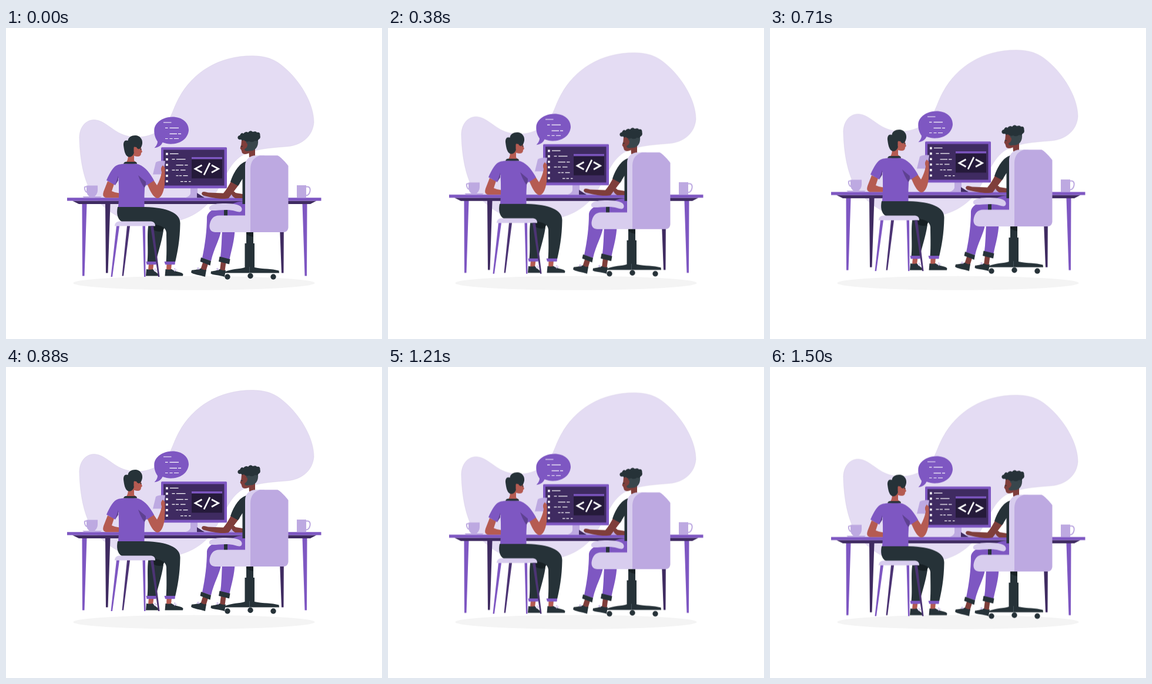
Animation, 640 px wide and 530 px high, one loop 1540 ms. Source, as an HTML page without scripts:

```html
<!DOCTYPE html>
<html lang="en">
<head>
<meta charset="utf-8">
<title>Pair at a desk</title>
<style>
  html, body { margin: 0; width: 100%; height: 100%; overflow: hidden; background: #fff; }
  svg { display: block; width: 100%; height: 100%; }
  .float { animation: float 1540ms linear -35ms infinite; }
  @keyframes float {
    0%, 100% { transform: translateY(.5px); }
    49.5% { transform: translateY(-10.1px); }
  }
  .purple { fill: #7e57c2; }
  .deep { fill: #3f2b61; }
  .shade { fill: #5e4191; }
  .stool-dark { fill: #4c3474; }
  .lilac { fill: #bda9e1; }
  .pale { fill: #d8cdee; }
  .dark { fill: #263238; }
  .slate { fill: #39464c; }
  .black { fill: #172024; }
  .tan { fill: #b55b52; }
  .brown { fill: #7f3e3b; }
  .line { fill: none; stroke: #fff; stroke-width: 1.2; }
  .code { fill: none; stroke: #fff; stroke-width: 2.7; }
  .handle { fill: none; stroke: #bda9e1; stroke-width: 2; }
  .lace { fill: none; stroke: #bda9e1; stroke-width: .9; }
</style>
</head>
<body>
<svg viewBox="0 0 640 530">
  <ellipse cx="320" cy="434.7" rx="205.5" ry="12" fill="#f4f4f4"/>

  <g class="float">
    <path fill="#e4dcf3" stroke="#cfc5e0" stroke-width=".4" d="M125 190C124 170 135 157 149 156.500C165 156 178 172 195 180C218 191 260 189 278 155C284 144 287 132 295 118C318 76 362 47 420 47.500C450 48 463 57 480 73C503 95 524 130 524 161C522 185 503 200 478 202C455 204 425 205 402 217C378 232 372 260 350 292C330 317 300 333 250 334C205 333 175 318 150 287C133 265 126 225 125 190Z"/>

    <!-- desk -->
    <path class="deep" d="M169 300h8.500L173.500 417.500H170ZM464.500 300h8.500L472.500 417.500H469ZM113 294.500H528.500L518 300H124Z"/>
    <path class="purple" d="M104 289.300H536.500V294.600H104ZM129.500 300h8L133.500 422.500H130ZM504.500 300h8L512 422.500H508.500Z"/>

    <!-- cups -->
    <path class="lilac" d="M137 268.500H156V276C156 282 153 285 151 287H163L160 289.300H133L130 287H142C139 285 137 282 137 276ZM495 268H511V289.300H495Z"/>
    <path class="handle" d="M138 270.500H135.500Q133.500 270.500 133.800 273Q134.500 280 139 280M511 270.500H514Q518.500 271.500 517.500 278Q516 285 511 285.500"/>

    <!-- monitor -->
    <path class="lilac" d="M314 272H326V285L331 289.300H305Q313 287 314 282Z"/>
    <rect class="purple" x="264" y="203.300" width="112" height="69.900" rx="1.500"/>
    <rect class="deep" x="268" y="207.500" width="103.500" height="61"/>
    <rect x="316" y="220" width="52" height="36.300" fill="#251a3a"/>
    <rect class="purple" x="316" y="220" width="52" height="3.500"/>
    <path class="code" d="M333.500 233.800L322 240L333.500 246.200M347 229.800L337 250.500M350 233.800L361.500 240L350 246.200"/>
    <path stroke="#fff" stroke-width="3.600" stroke-dasharray="3.600 5.720" d="M273.900 212.800V263.500"/>
    <path class="line" d="M279 214.300h14.500M282.500 223.700h5M290 223.700h15.500M289.500 233.700h12.500M304 233.700h5.500M282.500 242.200h5M289 242.200h5M297 242.200h8.500M289.500 251.700h4M295 251.700h4M301.500 251.700h8M297 261.700h4.500M303.500 261.700h4.500M311 261.700h3.500"/>
    <path class="lilac" d="M334 284H404L402 289.300H336Z"/>
    <path class="deep" d="M325 281L338 289.300H325Z"/>

    <!-- speech bubble -->
    <path class="purple" d="M252.500 204.200C256 201 258 197 258 193.500C254 188 252 181 252.300 174C253 161 267 151.800 283 151.500C300 151.500 311 161 311 174C310 187 299 196.500 284 197.500C278 198 272 197 266.500 195C264 201 258 204.200 252.500 204.200Z"/>
    <path class="line" d="M268 161h13.500M271 170.300h4.500M278.500 170.300h15.500M278.500 180.300h12.500M293 180.300h5M271 188.500h4.500M278.500 188.500h5M286 188.500h8"/>

    <!-- person on the stool -->
    <path class="tan" d="M243 401H251.500L250 413H242ZM273.500 401H282L281 413H273Z"/>
    <path class="dark" d="M239 411Q245 412.500 250 411C253 416 258 417 259.500 420.500V422.500H238ZM271.500 411Q277 412.500 282 411C287 416 299 415 301.500 419.500L301 422.500H270.500Z"/>
    <path class="lace" d="M251 413l3-3 1.500 3.500M252 415l5-2.500M284 413l3.500-3.500 1 4M286 415l5-3"/>
    <path class="dark" d="M243 333L268 345C265 365 258 385 255 399H240.500C243 378 239 350 243 333Z"/>
    <path class="black" d="M250 333H273L267 346Q256 349 249 342Z"/>
    <path class="dark" d="M190 305H237C274 306 297 315 296.500 333C296 362 292 382 288 399H272.500C274 382 273 362 273 349C272 340 265 336 250 335L197 330C189 325 188 315 190 305Z"/>
    <path class="purple" d="M238.500 398H256.500L255.500 403.300H239.500ZM269.500 398H288L287.500 403.300H271Z"/>
    <path class="pale" d="M185 337.500C185 332 189 329.500 194 329.500H245C251 329.500 254 332 254 337.500Z"/>
    <path class="purple" d="M188 337.500h5L181 424H178.500ZM232.500 337.500h4.500L237.500 424H235Z"/>
    <path class="stool-dark" d="M206 337.500h5L200 422.500H197.500ZM246 337.500h5L261.500 424H259Z"/>

    <path class="lilac" d="M255 229Q260 225.500 271 226.500L268 249.500H250Z"/>
    <path class="tan" d="M173 261L184 266L180 278Q186 281 193 281.500V289.300H170Q163 288 166 279ZM240 265L251 259L257 268Q263 257 265 246Q262 238 267 234L270.500 238Q271 252 270 267C268 283 263 290 257 290C250 288 245 277 240 265Z"/>
    <path class="tan" d="M208 216H218V226L223 230H203Q208 227 208 216Z"/>
    <path class="purple" d="M191 233C199 231 218 230 226 232.500C238 237 246 249 252 260L239 268.500L236.500 264Q235 285 235.500 305H191Q193 285 191.500 255L186 268L171 259.500C177 246 183 235 191 233Z"/>
    <path class="shade" d="M225 251L238 262V268L235.500 272.500Q229 263 225 251ZM191 252V260L186 267.500Z"/>
    <path class="dark" d="M200 231.500Q201 228 204 228H220Q223 229 223 231.500Z"/>
    <path class="tan" d="M216 196L229 194Q230.500 200 230 206L232 211L230 213Q230 219 224 219Q218 219 215 215Z"/>
    <path class="dark" d="M207.500 192C208 186 214 183 220 183C228 183 233 190 232 197C231 203 229 205 226 206.500L223 205Q222 201 218.500 204L217.500 214Q214 221 208 219.500C202 217 201 207 200 200C199.500 193 203 190 207.500 192Z"/>
    <path class="tan" d="M217.500 204Q218 201.500 221 203.500L222 211H217.500Z"/>
    <path class="dark" d="M228 205.500l2.500.3v1.700l-1.700-.2Z"/>

    <!-- person on the chair -->
    <path class="brown" d="M335.500 398L344 402L340 415L331 412ZM366 397L374.500 399L372.500 414L364 413Z"/>
    <path class="dark" d="M316 412.700C322 412 328 411.500 331.500 409.500Q336 413 341 412L339 424C330 421 318 420 315 416.500ZM349 414.700C356 414 360 413 364 411Q369 414 374 412.500L372 424C363 421 351 421 348.500 418.500Z"/>
    <path class="lace" d="M326 412l1-4 3 3M325 409l4 3M359 413l1-4 3 3M358 410l4 3"/>
    <path class="purple" d="M368 343H389.500C389 362 384 377 380.500 394H364.500C367 377 367 360 368 343ZM407 295V345H366C364 360 354 375 349 397L334 392C339 368 342 345 342 322C345 307 365 306 383 301Q393 295 407 295Z"/>
    <path class="dark" d="M332 391L349 397L347.500 404.700L330.500 398ZM363.500 389.500L381.500 394L380 402.500L362 398Z"/>

    <path class="brown" d="M383 280Q387 276 391 281L403 283V290H390Q384 287 383 280ZM384 259L398 265L379 290C368 293 349 289 336 285.500Q331 283 334.500 279.500Q337 278 344 280.500L370 281.500Q378 272 384 259Z"/>
    <path class="dark" d="M409 227C396 231 387 247 382 262L395 269L402.500 257V300H412Z"/>
    <path class="brown" d="M413 206H424V219Q420 222 414 220ZM401 191H416L414 213Q406 217 402 213L400.500 208L398.500 205Q401 199 401 191Z"/>
    <path class="slate" d="M409 191H429C430 202 425 210 414 209.500Q407 211 406 207Q409 200 409 191Z"/>
    <path class="brown" d="M406 197Q411 194 411 200Q410 205 406 206Z"/>
    <path class="dark" d="M400 190C394 192 392 184 398 183C400 179 402 178 404 180Q408 175 412 178Q416 173 420 177Q426 175 427 178Q433 177 432.500 183Q434 188 430 190Q428 194 424 192Q419 196 414 193Q408 195 405 191Q402 193 400 190Z"/>
    <path class="dark" d="M399.800 201h3v1.300h-3Z"/>

    <!-- office chair -->
    <path class="dark" d="M371 307h6v20h-6ZM409 347h12v20h-12ZM406.500 367h16.500v41C438 411 452 410 464.500 413.500L465 417.500H372V415.500C385 410 398 411 406.500 408Z"/>
    <path class="black" d="M409 347h12v9Q414 355 409 351Z"/>
    <path d="M414.500 407v10" stroke="#57636a" stroke-width=".7"/>
    <g class="dark">
      <circle cx="377" cy="424" r="4.700"/>
      <circle cx="416" cy="422.500" r="4.700"/>
      <circle cx="455" cy="424" r="4.700"/>
    </g>
    <path class="pale" d="M407 319.500V235C407 224 415 217.300 425 217.300H440V348H356C348 347.500 346 342 346.500 336C348 326 353 319.500 363 319.500Z"/>
    <path class="lilac" d="M416 240C416 226 424 220 432 217.300H462C466 218 477 230 480.500 235V340C480 345 477 348 472 348H416Z"/>
    <path class="pale" d="M346 305.500C348 300 360 299 374 299C390 299 401 302 401.500 308C402 315 396 314 390 312C378 308 362 311 352 311C347 311 345 309 346 305.500Z"/>
  </g>
</svg>
</body>
</html>
```
